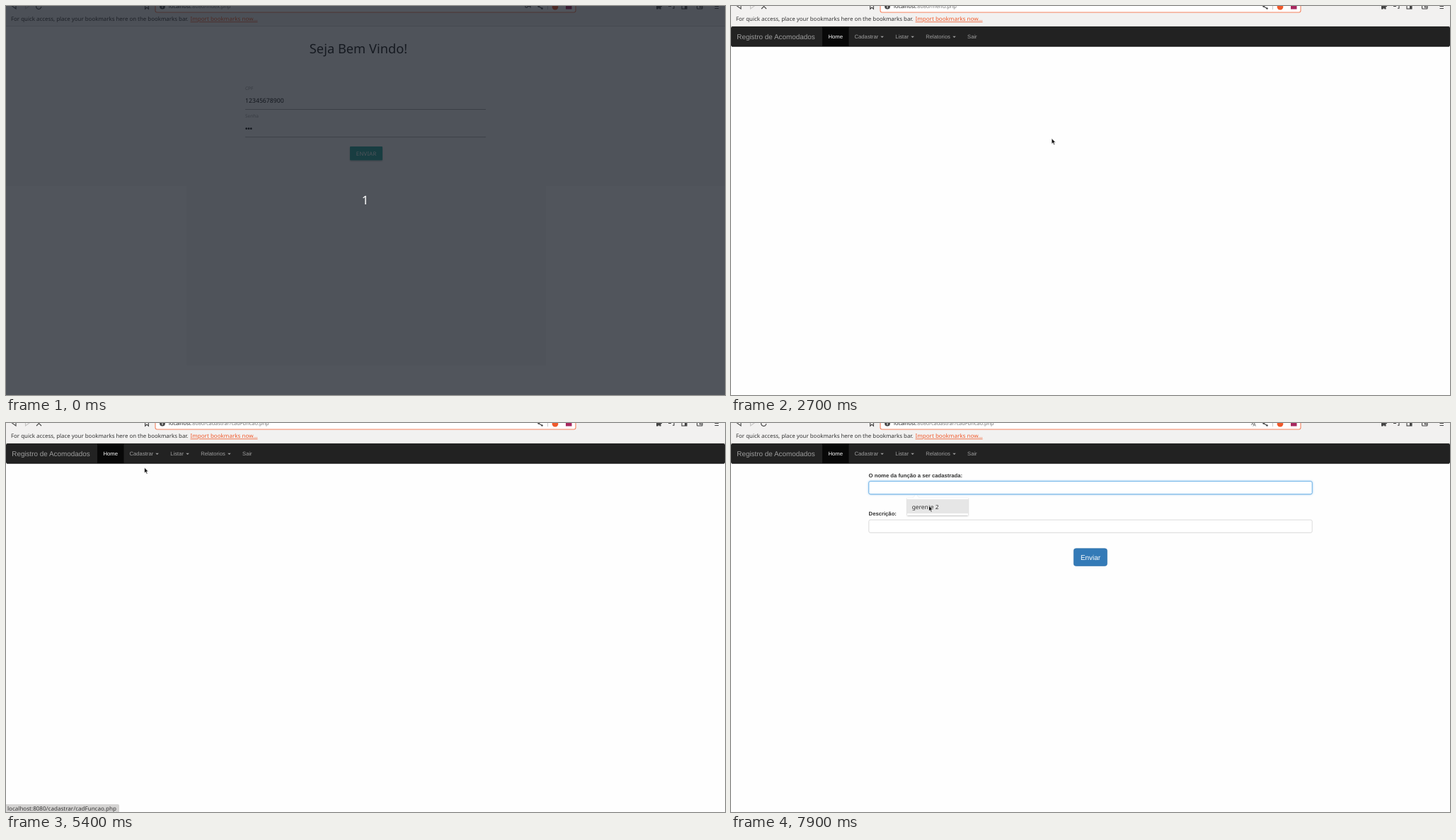
Recreate the animation shown at these times as an HTML page. Size 1016 px wide and 551 px high, loop 8 s.

```html
<!DOCTYPE html>
<html lang="pt-BR">
<head>
<meta charset="utf-8">
<title>Cadastro</title>
<style>
  html, body { margin: 0; width: 100%; height: 100%; overflow: hidden; background: #fefefe; }
  svg { display: block; width: 1016px; height: 551px; }
  text { font-family: "Noto Sans", "Open Sans", sans-serif; text-rendering: geometricPrecision; white-space: pre; }
  .arial text, text.arial { font-family: "Liberation Sans", Arial, sans-serif; }
  .nav text { font-size: 7.7px; fill: #9d9d9d; }
  .nav .lit { fill: #fff; }
  .nav .brand { font-size: 9.9px; }
  .nav path { fill: #9d9d9d; }
  .field { fill: #fff; stroke: #ccc; stroke-width: .7; }
  .icon { fill: none; stroke: #444; stroke-width: 1.1; }
  .solid { fill: #444; }
  .bold { font-size: 7.7px; font-weight: 700; fill: #333; }
  .url { font-size: 7.42px; fill: #777; }
  .url tspan { fill: #222; }
  .status { font-size: 8.05px; fill: #333; }
  .label { font-size: 6.5px; fill: #9e9e9e; }
  .pointer path { fill: #111; stroke: #fff; stroke-width: .7; stroke-linejoin: round; }
</style>
</head>
<body>
<svg viewBox="0 0 1016 551">
  <defs>
    <filter id="soft" x="-20%" y="-40%" width="140%" height="200%">
      <feDropShadow dx="0" dy="1" stdDeviation="1" flood-opacity=".3"/>
    </filter>
    <filter id="glow" x="-2%" y="-40%" width="104%" height="180%">
      <feDropShadow dx="0" dy="0" stdDeviation="1.4" flood-color="#66afe9" flood-opacity=".7"/>
    </filter>
    <clipPath id="btnClip"><rect x="486" y="199" width="46" height="19.5" rx="1"/></clipPath>
  </defs>
  <rect width="1016" height="551" fill="#fefefe"/>

  <!-- browser chrome -->
  <rect width="1016" height="28.5" fill="#f2f1f0"/>
  <path d="M0 28.5H1016" stroke="#d4d2d0" stroke-width=".8"/>
  <rect x="211" y="-12" width="594" height="21" rx="2.5" fill="#fff" stroke="#f5825f" stroke-width="1.1"/>
  <path class="icon" d="M14 -4V4L8.5 0Z"/>
  <path class="icon" d="M27.500 -4V4L33 0Z" style="stroke:#c5c4c3"/>
  <path class="icon" data-on="0-2000 2900-5300 5500-8000" d="M49.800 1A3.600 3.600 0 1 1 48.500 -2"/>
  <path class="icon" data-on="2000-2900 5300-5500" d="M43 -3L50 4M50 -3L43 4"/>
  <path class="icon" d="M196.600 -4V4.200L199 2L201.400 4.200V-4"/>
  <circle class="solid" cx="221" cy="0.500" r="3.900"/>
  <path d="M221 0V3" stroke="#fff"/>
  <text class="url" x="230" y="3.400" data-on="0-2300"><tspan>localhost</tspan>:8080/index.php</text>
  <text class="url" x="230" y="3.400" data-on="2300-3800"><tspan>localhost</tspan>:8080/menu.php</text>
  <text class="url" x="230" y="3.400" data-on="3800-5300"><tspan>localhost</tspan>:8080/menu.php#</text>
  <text class="url" x="230" y="3.400" data-on="5300-8000"><tspan>localhost</tspan>:8080/cadastrar/cadFuncao.php</text>
  <g data-on="0-2300">
    <circle class="icon" cx="735.500" cy="0.500" r="1.700"/>
    <path class="icon" d="M737 0.500H741V2.500"/>
  </g>
  <path class="icon" data-on="2900-5300 5500-8000" style="stroke:#777;stroke-width:.9"
    d="M734.500 -2H739M735 3L738 -1M736 0L738 2M737.800 4.500L739.600 0L741.400 4.500M738.500 3H740.700"/>
  <path class="icon" d="M757.500 -2L752.500 0.500L757.500 3.500"/>
  <circle class="solid" cx="752.500" cy="0.500" r="1.200"/>
  <circle class="solid" cx="757.500" cy="3.500" r="1.200"/>
  <path d="M765.500 0V5" stroke="#bbb" stroke-width=".8"/>
  <circle cx="776" cy="1.200" r="4.300" fill="#f0592b"/>
  <rect x="791" y="-4" width="8.500" height="8.500" fill="#a8275e"/>
  <path class="solid" d="M919 -3H927V1H925.500V4.500H923.500Q922.500 2 921.500 4.500H919Z"/>
  <path class="icon" d="M936 -2H944M936 0.500H940M942 3.200H944V-1"/>
  <rect class="icon" x="955" y="-4" width="7" height="8"/>
  <rect class="solid" x="959" y="-4" width="3" height="8"/>
  <rect class="icon" x="976.500" y="-4" width="7.500" height="8" rx="1"/>
  <path class="icon" d="M984 0H980.500V2H984M1001.500 0.500H1007M1001.500 3.500H1007"/>
  <text x="7" y="21.300" font-size="7.900" fill="#333">For quick access, place your bookmarks here on the bookmarks bar.</text>
  <text x="260.500" y="21.300" font-size="8.050" fill="#f1592a" text-decoration="underline">Import bookmarks now…</text>

  <!-- login page -->
  <g data-on="0-2300">
    <text x="498" y="67" font-size="18.300" fill="#1d1d1d" text-anchor="middle">Seja Bem Vindo!</text>
    <text class="label" x="338" y="118.500">CPF</text>
    <text x="338" y="137.300" font-size="8.700" font-weight="500" fill="#111">12345678900</text>
    <text class="label" x="338" y="158.200">Senha</text>
    <g fill="#111">
      <circle cx="339.700" cy="173.700" r="1.350"/>
      <circle cx="343" cy="173.700" r="1.350"/>
      <circle cx="346.300" cy="173.700" r="1.350"/>
    </g>
    <path d="M338 146.500H678M338 185.700H678" stroke="#9b9b9b" stroke-width=".8"/>
    <rect x="486" y="199" width="46" height="19.500" rx="1" fill="#26a69a" filter="url(#soft)"/>
    <rect x="486" y="199" width="46" height="19.500" rx="1" fill="#2bbbad" data-on="1200-2300"/>
    <circle id="ripple" cx="507" cy="211" fill="#fff" fill-opacity=".25" clip-path="url(#btnClip)"/>
    <text x="509.200" y="211.600" font-size="7.700" letter-spacing=".275" fill="#fff" text-anchor="middle">ENVIAR</text>
  </g>

  <!-- navigation -->
  <g class="nav arial" data-on="2300-8000">
    <rect y="29" width="1016" height="28.500" rx="2" fill="#222"/>
    <path d="M1 57.200H1015" stroke="#080808" stroke-width=".6"/>
    <rect x="129" y="29.500" width="37.500" height="27.500" style="fill:#080808"/>
    <text id="brand" class="brand" x="8.300" y="47">Registro de Acomodados</text>
    <text class="lit" x="137.500" y="46.200">Home</text>
    <text id="cad" x="174.500" y="46.200">Cadastrar</text>
    <text x="232.300" y="46.200">Listar</text>
    <text x="275.200" y="46.200">Relatorios</text>
    <text x="334" y="46.200">Sair</text>
    <path d="M211.300 42.700h4.600l-2.300 2.400zM254.300 42.700h4.600l-2.300 2.400zM313.200 42.700h4.600l-2.300 2.400z"/>
  </g>

  <!-- open menu -->
  <g class="arial" data-on="5100-5400" font-size="7.700" fill="#333">
    <rect x="166.500" y="57.500" width="88" height="50" fill="#fff" stroke="#ccc" stroke-width=".6" filter="url(#soft)"/>
    <rect x="167" y="60.500" width="87" height="14.300" fill="#f5f5f5" data-on="5200-5400"/>
    <text x="177.500" y="70.300">Função</text>
    <text x="177.500" y="84.600">Funcionario</text>
    <text x="177.500" y="98.900">Quarto</text>
  </g>

  <!-- form page -->
  <g class="arial" data-on="5500-8000">
    <text class="bold" x="194.600" y="76.800">O nome da função a ser cadastrada:</text>
    <rect class="field" x="194.800" y="82.600" width="626.400" height="18.200" rx="2.200"/>
    <g id="focus" data-on="6600-8000">
      <rect x="194.800" y="82.600" width="626.400" height="18.200" rx="2.200" fill="#fff" stroke="#66afe9" stroke-width=".9" filter="url(#glow)"/>
    </g>
    <g data-on="7500-7900">
      <rect x="195.400" y="83.200" width="625.200" height="17" rx="1.800" fill="#e8f0fe"/>
      <text x="201.800" y="94.500" font-size="7.700" fill="#555">gerente 2</text>
    </g>
    <path d="M202 87.500V96" stroke="#444" stroke-width=".8" data-on="6600-7100"/>
    <text class="bold" x="194.600" y="131.300">Descrição:</text>
    <rect class="field" x="194.800" y="137.200" width="626.400" height="18.200" rx="2.200"/>
    <rect x="484.300" y="177.700" width="47.200" height="24.800" rx="3.300" fill="#337ab7" stroke="#2e6da4" stroke-width=".6"/>
    <text x="508" y="193.500" font-size="9.900" fill="#fff" text-anchor="middle">Enviar</text>
  </g>
  <g data-on="6600-8000">
    <path d="M249 106H257.500L261.500 102L265.500 106H335V130.500H249Z" fill="#fff" filter="url(#soft)"/>
    <rect x="249" y="108" width="86" height="20.200" fill="#e6e6e6" data-on="7400-8000"/>
    <text x="255.700" y="121.500" font-size="8.400" fill="#333">gerente 2</text>
  </g>

  <!-- link preview -->
  <g data-on="3500-5200">
    <path d="M0 540H105.500Q107.500 540 107.500 542V551H0Z" fill="#d5d4d3"/>
    <text class="status" x="2" y="548.800">localhost:8080/menu.php#</text>
  </g>
  <g data-on="5200-5700">
    <path d="M0 540H158Q160 540 160 542V551H0Z" fill="#d5d4d3"/>
    <text class="status" x="2" y="548.800">localhost:8080/cadastrar/cadFuncao.php</text>
  </g>

  <g id="pointer" class="pointer">
    <path id="arrow" d="M0 0V8L1.900 6.300L3.200 9.300L4.600 8.700L3.300 5.800H5.700Z"/>
    <path id="hand" d="M1.300 0.500Q2.200 -0.700 3 0.500V3L6.200 3.700Q7.200 4 7 5.500L6.300 9.500H2.300L-0.500 6Q-0.800 4.600 1.300 5.500Z"/>
    <path id="beam" d="M-2 -4.300H2M0 -4.300V4.300M-2 4.300H2" style="stroke:#333;stroke-width:1"/>
  </g>

  <g data-on="0-100">
    <rect width="1016" height="551" fill="#141923" fill-opacity=".74"/>
    <text x="507.500" y="281" font-size="17" fill="#fff" text-anchor="middle">1</text>
  </g>
</svg>
<script>
  const LOOP = 8000, STEP = 100;
  const $ = id => document.getElementById(id);

  const parts = [...document.querySelectorAll('[data-on]')].map(el => ({
    el, spans: el.dataset.on.split(' ').map(s => s.split('-').map(Number))
  }));

  // time, x, y of the pointer's hot spot
  const path = [
    [600, 1002, 295], [1300, 506.5, 210], [2400, 506.5, 210], [3700, 111, 43],
    [4000, 101, 45], [4400, 117, 44], [4600, 117, 44], [5000, 188, 44],
    [5300, 195.5, 63], [5600, 195.5, 63], [6100, 242.5, 92.3],
    [7100, 242.5, 92.3], [7700, 279.5, 117], [8000, 279.5, 117]
  ];

  const within = (t, a, b) => t >= a && t < b;
  const show = (el, on) => { el.style.display = on ? '' : 'none'; };

  function pointerAt(t) {
    const i = Math.max(1, path.findIndex(p => p[0] >= t));
    const [t0, x0, y0] = path[i - 1], [t1, x1, y1] = path[i];
    const k = Math.min(1, Math.max(0, (t - t0) / (t1 - t0)));
    const e = k * k * (3 - 2 * k);
    return [x0 + (x1 - x0) * e, y0 + (y1 - y0) * e];
  }

  function draw(t) {
    for (const { el, spans } of parts) show(el, spans.some(([a, b]) => within(t, a, b)));

    const [x, y] = pointerAt(t);
    const beam = t >= 5500 && within(y, 83, 101);
    const hand = within(t, 3500, 5400);
    show($('pointer'), t >= 600);
    $('pointer').setAttribute('transform', `translate(${x} ${y})`);
    show($('beam'), beam);
    show($('hand'), hand);
    show($('arrow'), !beam && !hand);

    $('brand').classList.toggle('lit', hand && x < 129);
    $('cad').classList.toggle('lit', hand && x >= 166);
    $('ripple').setAttribute('r', within(t, 2000, 2300) ? (t - 2000) * .15 : 0);
    $('focus').style.opacity = t < 6700 ? .7 : 1;
  }

  function tick() {
    const t = performance.now() % LOOP;
    draw(Math.floor(t / STEP) * STEP);
    requestAnimationFrame(tick);
  }
  tick();
</script>
</body>
</html>
```
